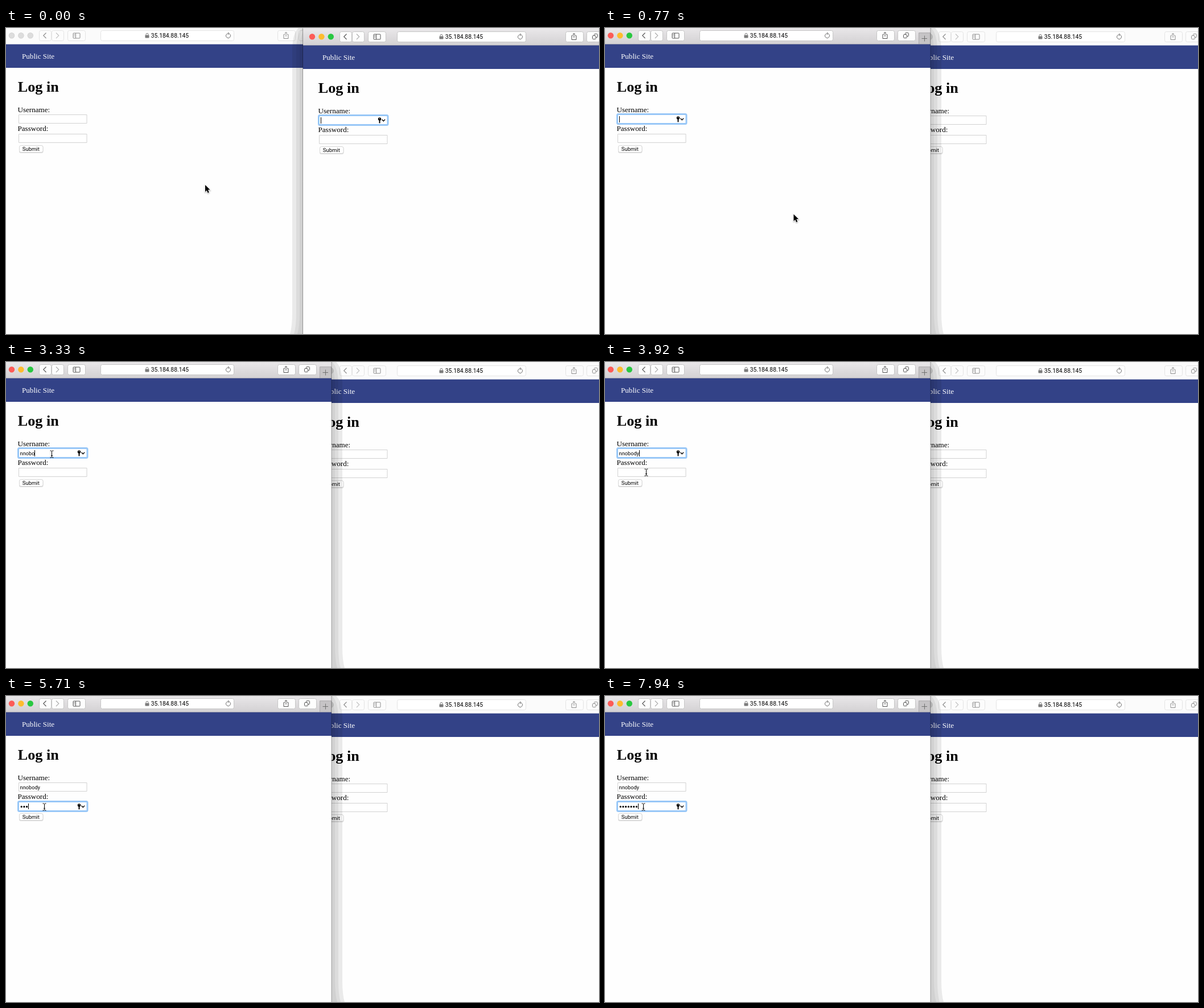
These frames come from a looping animation (1042 px wide and 538 px high, 8000 ms). An HTML page with a canvas:

```html
<!DOCTYPE html>
<html lang="en">
<head>
<meta charset="utf-8">
<title>Log in</title>
<style>
  html, body { margin: 0; width: 100%; height: 100%; overflow: hidden; background: #fff; }
  canvas { display: block; }
</style>
</head>
<body>
<canvas id="stage" width="1042" height="538"></canvas>
<script>
const c = document.getElementById('stage').getContext('2d');
const LOOP = 8000, W = 1042, H = 538;
const SERIF = '"Liberation Serif", "Times New Roman", serif';
const SANS = 'Roboto, Inter, sans-serif';
const FIELD_FONT = '9.2px ' + SANS;
const NAME = 'nnobody';
const ROW = 34, DOT = 4.7;

// Times at which things happen
const SWITCH = 770, CLICK = 4370;
const NAME_KEYS = [2580, 2730, 2880, 3030, 3330, 3480, 3630];
const PASS_KEYS = [4960, 5560, 5710, 6150, 6900, 7790, 7940];
const CARET_OFF = [[330, 770], [1220, 1670], [2290, 2580], [4070, 4370],
  [4820, 4960], [5410, 5560], [6600, 6900], [7490, 7790]];
const MOVE_TICKS = [0, 150, 330, 480, 1220, 1370, 1520, 1670, 1840, 1990, 3780, 3920, 4070, 4220, 4370];
const PATH = [[0, 350, 276], [480, 331.5, 327.5], [1070, 331.5, 327.5], [1990, 80, 162],
  [3630, 80, 162], [4070, 69, 206], [4370, 67, 195]];

const count = (times, t) => times.filter(k => k <= t).length;

function text(s, x, y, font, color = '#000') {
  c.font = font;
  c.fillStyle = color;
  c.fillText(s, x, y);
}

function line(points, color, width = 1) {
  c.beginPath();
  points.forEach(([x, y]) => c.lineTo(x, y));
  c.strokeStyle = color;
  c.lineWidth = width;
  c.stroke();
}

function box(x, y, w, h, r, fill, stroke, width = 1) {
  c.beginPath();
  c.roundRect(x, y, w, h, r);
  if (fill) { c.fillStyle = fill; c.fill(); }
  if (stroke) { c.strokeStyle = stroke; c.lineWidth = width; c.stroke(); }
}

function disc(x, y, r, fill) {
  c.beginPath();
  c.arc(x, y, r, 0, 7);
  c.fillStyle = fill;
  c.fill();
}

function toolbar(right, active) {
  const mid = (right - 6) / 2, edge = active ? '#c6c6c6' : '#e4e4e4';
  const ink = active ? '#555' : '#8c8c8c', faint = active ? '#adadad' : '#c2c2c2';
  const button = (x, w) => box(x + .5, 4.5, w, 18, 3, active ? '#fdfdfd' : '#fcfcfc', edge);

  const grad = c.createLinearGradient(0, -3, 0, 28);
  grad.addColorStop(0, active ? '#ebe9eb' : '#fbfbfb');
  grad.addColorStop(1, active ? '#d3d1d3' : '#fbfbfb');
  box(-6, -3, right + 6, 32, [4, 4, 0, 0], grad);
  if (active) { c.fillStyle = '#b4b2b4'; c.fillRect(-6, 28, right + 6, 1); }

  ['#fc5b57', '#fdbc2e', '#28c840'].forEach((color, i) => {
    const x = 10 + 16.4 * i;
    disc(x, 13.3, 5.2, active ? color : '#cfcfcf');
    if (!active) disc(x, 13.3, 4.5, '#dddddd');
  });

  button(58, 21);
  button(80, 21);
  line([[70.5, 8.5], [65.8, 13.3], [70.5, 18]], ink, 1.2);
  line([[88, 8.5], [92.7, 13.3], [88, 18]], faint, 1.2);

  button(108, 31);
  box(118, 9, 12, 9, 1, null, ink);
  line([[122.5, 9], [122.5, 18]], ink);
  line([[119, 11.5], [121.5, 11.5]], ink, .7);
  line([[119, 14], [121.5, 14]], ink, .7);

  // Address field; wider windows get a slightly wider one
  const half = active !== null && right > 560 ? 117.5 : 113.5;
  box(Math.round(mid - half) + .5, 4.5, half * 2 - 1, 18, 3, '#fff', edge);
  box(mid - 38.5, 12.5, 7, 5, .7, '#7c7c7c');
  box(mid - 37, 9.3, 4, 5, 2, null, '#7c7c7c');
  text('35.184.88.145', mid - 28.2, 17.2, '10.35px ' + SANS);
  const rx = mid + half - 10;
  c.beginPath();
  c.arc(rx, 13.6, 4, -.9, 4.9, false);
  c.strokeStyle = '#737373';
  c.lineWidth = 1;
  c.stroke();
  line([[rx - .5, 7.6], [rx + 2, 9.8], [rx - .7, 11.8]], '#737373');

  const sx = right - 80, px = right - 43;
  button(right - 95, 31);
  line([[sx - 2, 11.5], [sx - 4, 11.5], [sx - 4, 18.5], [sx + 4, 18.5], [sx + 4, 11.5], [sx + 2, 11.5]], ink);
  line([[sx, 15], [sx, 7.5]], ink);
  line([[sx - 2.3, 9.7], [sx, 7.3], [sx + 2.3, 9.7]], ink);
  button(right - 58, 31);
  box(px - 1.5, 8.5, 6, 6, 1, null, ink);
  box(px - 4.5, 11.5, 6, 6, 1, active ? '#fdfdfd' : '#fcfcfc', ink);

  if (active) {
    box(right - 20.5, 8.5, 20, 20, 0, '#c5c3c5', '#adabad');
    line([[right - 15.5, 18.5], [right - 6, 18.5]], '#707070');
    line([[right - 10.5, 13.5], [right - 10.5, 23.5]], '#707070');
  }
}

function field(y, focused) {
  box(22.5, y + .5, 119.5, 15, 0, '#fff', '#d2d2d2');
  if (!focused) return;
  box(21.5, y - .5, 121.5, 17, 2, '#fff', '#98c7f7', 3);
  disc(128.5, y + 6, 2.7, '#000');
  c.fillRect(127.5, y + 8, 2, 5.3);
  disc(128.5, y + 5, .7, '#fff');
  line([[132.5, y + 6.8], [135.3, y + 9.7], [138.1, y + 6.8]], '#000', 1.3);
}

function browser(dx, dy, right, active, form) {
  c.save();
  c.translate(dx, dy);
  c.fillStyle = '#fefefe';
  c.fillRect(-6, 28, right + 6, H);
  toolbar(right, active);
  c.fillStyle = '#334287';
  c.fillRect(-6, 28.6, right + 6, 41.4);
  text('Public Site', 28, 54, '13.1px ' + SERIF, '#fff');
  text('Log in', 20.7, 111.5, 'bold 26.2px ' + SERIF);
  text('Username:', 20.5, 147.5, '13.1px ' + SERIF);
  text('Password:', 20.5, 181.3, '13.1px ' + SERIF);

  const row = active ? form.row : -1;
  field(152, row === 0);
  field(152 + ROW, row === 1);
  box(23, 207, 42.5, 13, 3, '#dcdcdc');
  box(23.5, 206.5, 41.5, 12, 3, '#fff', '#d6d6d6');
  text('Submit', 28.8, 216, '9.5px ' + SANS);

  const typed = NAME.slice(0, form.name);
  text(typed, 24.6, 163.6, FIELD_FONT);
  for (let i = 0; i < form.pass; i++) disc(27.2 + DOT * i, 194.7, 1.6, '#000');
  if (active && form.caret) {
    const x = form.row ? 25.3 + DOT * form.pass : 25 + c.measureText(typed).width;
    c.fillStyle = '#000';
    c.fillRect(Math.floor(x), 155 + ROW * form.row, 1, form.row ? 10 : 11);
  }
  c.restore();
}

// Stepped shadow beside the front window; dir is the side it falls to
function shadow(edge, dir) {
  [[19, .08], [12, .06], [6, .05]].forEach(([d, alpha]) => {
    const at = n => edge + dir * n;
    c.beginPath();
    c.moveTo(edge, 0);
    c.lineTo(at(d - 11), 0);
    c.quadraticCurveTo(at(d - 1), 9, at(d), 36);
    c.lineTo(at(d), 500);
    c.quadraticCurveTo(at(d), 525, at(d + 4), H);
    c.lineTo(edge, H);
    c.fillStyle = `rgba(0,0,0,${alpha})`;
    c.fill();
  });
}

function pointAt(t) {
  const i = PATH.findLastIndex(p => p[0] <= t);
  const [t0, x0, y0] = PATH[i], [t1, x1, y1] = PATH[i + 1] || [LOOP, x0, y0];
  const u = (t - t0) / (t1 - t0), k = u * u * (3 - 2 * u);
  return [x0 + (x1 - x0) * k, y0 + (y1 - y0) * k];
}

function pointer(t) {
  const [x, y] = pointAt(MOVE_TICKS.findLast(k => k <= t));
  const overField = x > 22 && x < 143 && [160, 194].some(m => Math.abs(y - m) < 9);
  c.save();
  c.translate(x, y);
  if (overField) {
    line([[-2.5, -6], [-.8, -6], [.5, -5], [1.8, -6], [3.5, -6]], '#000');
    line([[-2.5, 6], [-.8, 6], [.5, 5], [1.8, 6], [3.5, 6]], '#000');
    line([[.5, -5], [.5, 5]], '#000');
    line([[-1, 2.5], [2, 2.5]], '#000');
  } else {
    c.beginPath();
    [[0, 0], [0, 12], [2.8, 9.4], [4.7, 14], [6.8, 13.1], [4.9, 8.6], [8.6, 8.6]]
      .forEach(([px, py]) => c.lineTo(px, py));
    c.closePath();
    c.shadowColor = 'rgba(0,0,0,.35)';
    c.shadowBlur = 2;
    c.shadowOffsetY = 1;
    c.strokeStyle = '#fff';
    c.lineWidth = 1.6;
    c.stroke();
    c.shadowColor = 'transparent';
    c.fillStyle = '#000';
    c.fill();
  }
  c.restore();
}

function draw(t) {
  const leftFront = t >= SWITCH;
  const caret = !CARET_OFF.some(([a, b]) => t >= a && t < b);
  const form = { row: t >= CLICK ? 1 : 0, name: count(NAME_KEYS, t), pass: count(PASS_KEYS, t), caret };
  const left = () => browser(0, 0, 572, leftFront, form);
  const right = () => browser(528, 2, 550, !leftFront, { row: 0, name: 0, pass: 0, caret });

  c.clearRect(0, 0, W, H);
  if (leftFront) {
    right();
    shadow(572, 1);
    left();
    line([[572, 0], [572, H]], 'rgba(0,0,0,.3)');
  } else {
    left();
    shadow(522, -1);
    right();
    line([[521.5, 1], [521.5, H]], 'rgba(0,0,0,.3)');
  }
  pointer(t);
}

const start = performance.now();
function frame() {
  draw((performance.now() - start) % LOOP);
  requestAnimationFrame(frame);
}
frame();
</script>
</body>
</html>
```
